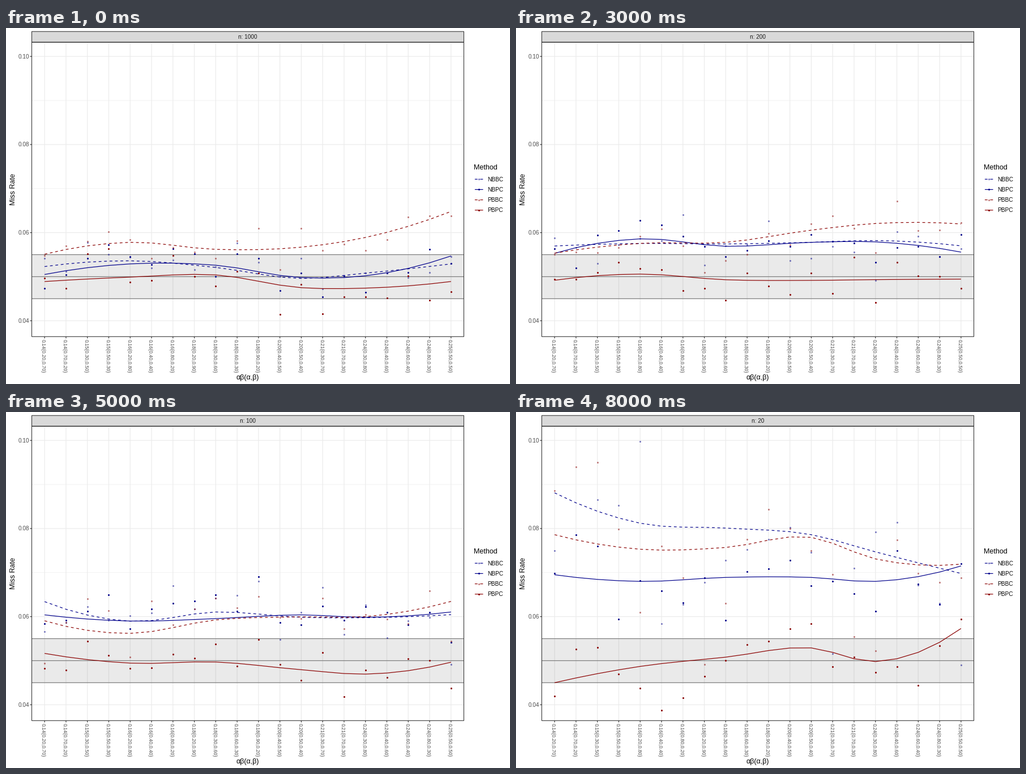
A matplotlib script that plays this animation: 890x629 px, repeating every 9000 ms.

```python
import numpy as np
import matplotlib.pyplot as plt
from matplotlib.animation import FuncAnimation
from matplotlib.patches import Rectangle

plt.rcParams["font.family"] = "Liberation Sans"
plt.rcParams["path.snap"] = False

W, H, DPI = 890, 629, 100
PT = 72 / DPI                      # points per pixel
LEFT, RIGHT, TOP, BOTTOM = 45.5, 808.5, 25.2, 545.3
LINE = 1.2 * PT
BLUE, RED, DARK = "#00008B", "#8B0000", "#333333"
METHODS = {"NBBC": (BLUE, True), "NBPC": (BLUE, False),
           "PBBC": (RED, True), "PBPC": (RED, False)}
SIZES = [1000, 500, 250, 200, 150, 100, 75, 50, 20]

# Every pair of tenths whose product lies in 0.14..0.25
PAIRS = sorted((a * b, a, b) for a in range(2, 10) for b in range(2, 10)
               if 14 <= a * b <= 25)
X = np.arange(1, len(PAIRS) + 1)

# Heights of each method's curve (1/10000) at a few key positions
KEY_X = np.array([1, 5, 9, 13, 16, 20])
KEYS = {
    1000: [[523, 536, 521, 496, 508, 529], [505, 529, 526, 498, 502, 547],
           [551, 578, 562, 567, 589, 648], [489, 499, 504, 475, 474, 489]],
    500: [[583, 557, 538, 517, 532, 542], [574, 548, 528, 522, 528, 535],
          [605, 583, 575, 603, 610, 597], [546, 507, 478, 469, 467, 478]],
    250: [[558, 581, 572, 581, 585, 549], [544, 596, 566, 575, 579, 531],
          [543, 585, 578, 609, 632, 610], [478, 516, 493, 501, 512, 499]],
    150: [[589, 566, 578, 573, 577, 605], [568, 569, 574, 583, 579, 597],
          [571, 560, 578, 600, 602, 636], [515, 489, 493, 476, 462, 487]],
    75: [[679, 613, 643, 624, 618, 604], [640, 611, 617, 625, 618, 624],
         [610, 564, 607, 599, 598, 633], [518, 500, 501, 483, 477, 506]],
    20: [[881, 812, 801, 786, 747, 698], [695, 680, 689, 689, 680, 715],
         [786, 753, 757, 780, 731, 719], [450, 487, 508, 529, 498, 573]],
}


def smooth(keys):
    """Cubic Hermite curve through the key heights, sampled at X."""
    slope = np.gradient(keys, KEY_X, edge_order=2)
    j = np.clip(np.searchsorted(KEY_X, X, side="right") - 1, 0, len(KEY_X) - 2)
    h = KEY_X[j + 1] - KEY_X[j]
    t = (X - KEY_X[j]) / h
    return (keys[j] * (1 + 2 * t) * (1 - t) ** 2
            + keys[j + 1] * t * t * (3 - 2 * t)
            + h * t * (1 - t) * (slope[j] * (1 - t) - slope[j + 1] * t))


def trends(n):
    """The four curves for sample size n, linear in 1/n between known sizes."""
    known = sorted(KEYS, reverse=True)
    inv = [1 / k for k in known]
    i = min(np.searchsorted(inv, 1 / n, side="right") - 1, len(known) - 2)
    w = (1 / n - inv[i]) / (inv[i + 1] - inv[i])
    keys = (1 - w) * np.array(KEYS[known[i]]) + w * np.array(KEYS[known[i + 1]])
    return np.array([smooth(k) for k in keys]) / 1e4


def scatter_rates(n, curves):
    """Simulated rates (5000 runs each) around the curves, wider for small n."""
    rng = np.random.default_rng(n)
    shared, own = rng.normal(size=20), rng.normal(size=(4, 20))
    bc, pc = 28 + 1600 / n, 26 + 500 / n
    spread = np.array([bc, pc, bc, pc])[:, None] / 1e4
    return np.round((curves + spread * (0.75 * shared + 0.66 * own)) * 5000) / 5000


def px(x):
    return LEFT + (x - 0.4) * (RIGHT - LEFT) / 20.2


def py(rate):
    return 517.2 - (rate - 0.04) * 7783


fig = plt.figure(figsize=(W / DPI, H / DPI), dpi=DPI, facecolor="white")
ax = fig.add_axes([0, 0, 1, 1])
ax.set(xlim=(0, W), ylim=(H, 0))
ax.axis("off")


def seg(x, y, color, width=LINE, z=1, **kw):
    return ax.plot(x, y, color=color, lw=width, zorder=z,
                   solid_capstyle="butt", dash_capstyle="butt", **kw)[0]


def box(y0, y1, fill, edge, z, **kw):
    ax.add_patch(Rectangle((LEFT, y0), RIGHT - LEFT, y1 - y0, facecolor=fill,
                           edgecolor=edge, zorder=z, **kw))


def label(x, y, s, size, color="black", ha="center", rot=0):
    """Text whose digit height is centred on (x, y)."""
    a = np.radians(rot)
    return ax.text(x + 0.35 * size * np.sin(a), y + 0.35 * size * np.cos(a), s,
                   fontsize=size * PT, color=color, ha=ha, va="baseline",
                   rotation=rot, rotation_mode="anchor", zorder=6)


def dots(x, y, color, faded):
    return ax.scatter(x, y, s=(3.1 * PT) ** 2, color=color, lw=0,
                      alpha=0.5 if faded else 1, zorder=4)


def curve(x, y, color, dashed):
    return seg(x, y, color, z=5, ls=(0, (4, 4)) if dashed else "-")


# Grid, axes and strip
for r in (0.05, 0.07, 0.09):
    seg([LEFT, RIGHT], [py(r)] * 2, "#EBEBEB", LINE / 2)
for r in (0.04, 0.06, 0.08, 0.10):
    seg([LEFT, RIGHT], [py(r)] * 2, "#EBEBEB")
    seg([LEFT - 3.1, LEFT], [py(r)] * 2, DARK)
    label(41, py(r), f"{r:.2f}", 10, "#4D4D4D", "right")
for x, (ab, a, b) in zip(px(X), PAIRS):
    seg([x, x], [TOP, BOTTOM], "#EBEBEB")
    seg([x, x], [BOTTOM, BOTTOM + 3.1], DARK)
    label(x - 2, 549.5, f"{ab / 100:.2f}({a / 10:.2f},{b / 10:.2f})", 8.75,
          "#4D4D4D", "left", -90)

box(py(0.055), py(0.045), "#333333", "none", 2, alpha=0.1)
for r in (0.045, 0.05, 0.055):
    seg([LEFT, RIGHT], [py(r)] * 2, "#7A7A7A", z=3)
box(TOP, BOTTOM, "none", DARK, 6, lw=LINE * 0.9)
box(6.2, TOP, "#D9D9D9", DARK, 5, lw=LINE * 0.9)
strip = label(427, 15.8, "", 10, "#1A1A1A")
label(427, 616.5, "αβ(α,β)", 12.5)
label(11.3, 285, "Miss Rate", 12.5, rot=90)

# Legend
label(825.6, 246, "Method", 12.5, ha="left")
for i, (name, (color, faded)) in enumerate(METHODS.items()):
    y = 267.2 + 18.2 * i
    dots([835.2], [y], color, faded)
    curve([827.9, 842.5], [y, y], color, faded)
    label(850.3, y, name, 10, ha="left")

points = [dots(px(X), 0 * X, *style) for style in METHODS.values()]
lines = [curve(px(X), 0 * X, *style) for style in METHODS.values()]


def update(i):
    n = SIZES[i]
    curves = trends(n)
    rates = scatter_rates(n, curves)
    strip.set_text(f"n: {n}")
    for k in range(4):
        points[k].set_offsets(np.column_stack([px(X), py(rates[k])]))
        lines[k].set_ydata(py(curves[k]))
    return [strip, *points, *lines]


anim = FuncAnimation(fig, update, frames=len(SIZES), interval=1000,
                     repeat=True, repeat_delay=0, blit=False)
plt.show()
```
